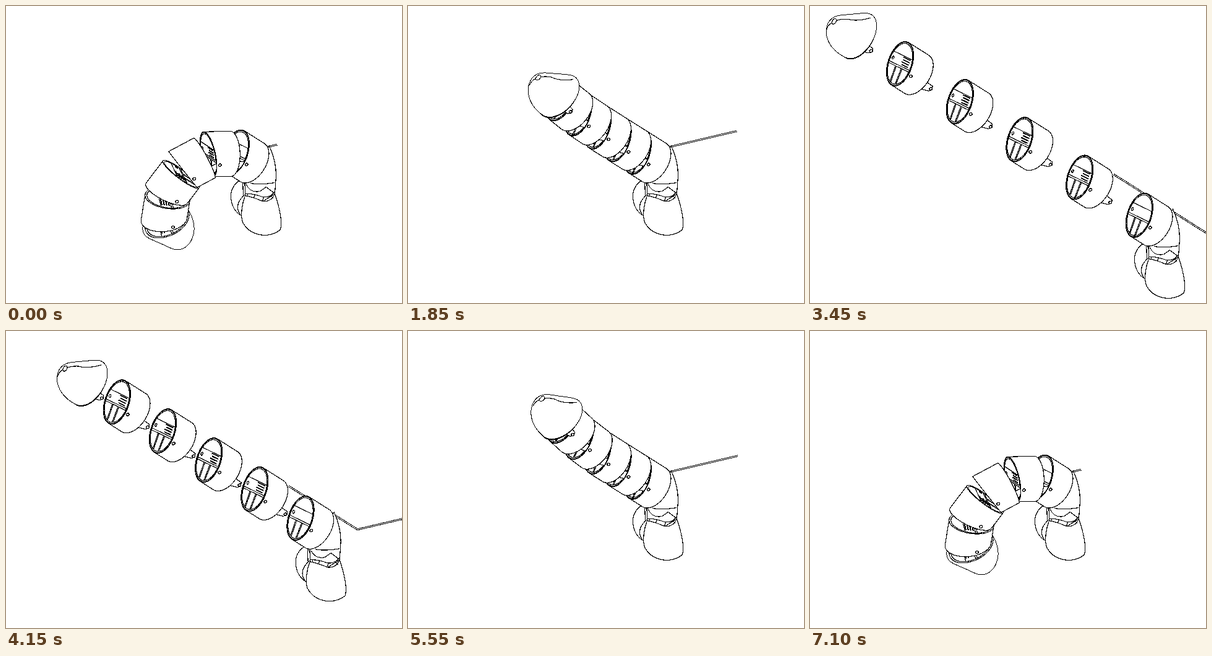
Write an HTML page that moves like this. It is 640 px wide and 480 px high and loops after 7.15 s.

```html
<!DOCTYPE html>
<html>
<head>
<meta charset="utf-8">
<style>
html, body { margin: 0; height: 100%; overflow: hidden; background: #fff; }
svg { display: block; width: 640px; height: 480px; }
</style>
</head>
<body>
<svg viewBox="0 0 640 480"><g id="art" transform="translate(.5 .5)" fill="#fff" stroke="#000" stroke-width="1.2" shape-rendering="crispEdges"></g></svg>
<script>
// Screen projection (x, y, depth) of the arm axis, its curl direction and the hinge pin.
const U = [-.683, -.431, .59], V = [-.628, .759, -.171], W = [.374, .487, .789];
const L = 47.3, R = 36.5, LOOP = 7150, TICK = 50;
const SPREAD = [64.4, 40.8], HINGE = [374.6, 238, 0];
const art = document.getElementById('art');

const clamp = (x, lo, hi) => Math.min(hi, Math.max(lo, x));
const mix = (a, A, b, B) => A.map((n, i) => a * n + b * B[i]);
const range = (n, f) => Array.from({length: n}, (_, i) => f(i));
const fmt = p => p[0].toFixed(1) + ' ' + p[1].toFixed(1);
const line = pts => 'M' + pts.map(fmt).join('L');
const loop = pts => line(pts) + 'Z';
const arc = ([a, b, c]) => `M${fmt(a)}Q${fmt(b)} ${fmt(c)}`;
const path = (d, attrs = '') => `<path d="${d}" ${attrs}/>`;
const OPEN = 'fill="none"', BARE = 'stroke="none"';

function hull(pts) {
  pts = [...pts].sort((a, b) => a[0] - b[0] || a[1] - b[1]);
  const half = list => {
    const out = [];
    for (const p of list) {
      while (out.length > 1) {
        const [a, b] = out.slice(-2);
        if ((b[0] - a[0]) * (p[1] - a[1]) - (b[1] - a[1]) * (p[0] - a[0]) > 0) break;
        out.pop();
      }
      out.push(p);
    }
    return out.slice(0, -1);
  };
  return [...half(pts), ...half(pts.reverse())];
}

// Circle around the axis; plane(v) gives the position of the cut along it.
const circle = (at, r, plane, v0 = 0, w0 = 0) => range(48, i => {
  const f = i * Math.PI / 24, v = v0 + r * Math.cos(f);
  return at(plane(v), v, w0 + r * Math.sin(f));
});

const front = v => L + 5.5 - .227 * v;
const back = () => L - 34;
const headBack = () => 12;

function opening(at, r, plane, geared) {
  // m runs along the shelves, n across them.
  const inside = (m, n) => {
    const v = .96 * n - .27 * m;
    return at(plane(v), v, .27 * n + .96 * m);
  };
  const edge = x => Math.sqrt((r - 3) ** 2 - x * x);
  const shelves = [-14, 3, 6].map(n => line([inside(-edge(n), n), inside(edge(n), n)]));
  const ribs = [-11, -8, 8, 11].map(m => line([inside(m, 6), inside(m * .9, edge(m))]));
  const teeth = range(4, i => line([inside(2 + 3 * (i % 2), i * 4 - 12), inside(26, i * 4 - 12)]));
  return path(loop(circle(at, r, plane))) +
    path(loop(circle(at, r - 3, plane))) +
    path(shelves.join('') + ribs.join(''), OPEN) +
    (geared ? path(teeth.join(''), OPEN + ' stroke-width="2"') : '') +
    path(loop(circle(at, 2.6, plane, 3, -26)));
}

function pin(at, u) {
  const [x, y] = at(u, 0, R);
  return `<ellipse cx="${x}" cy="${y}" rx="2.4" ry="2" transform="rotate(-25 ${x} ${y})" stroke-width="1.4"/>`;
}

function lug(at) {
  const edge = [[17, -6], [0, -5], [-4, 0], [0, 5], [17, 10]];
  return path(loop(edge.map(([u, v]) => at(u, v, R - 1)))) + pin(at, 0);
}

function ring({at, a, b}, next, geared) {
  const rim = circle(at, R, front), body = hull([...rim, ...circle(at, R, back)]);
  let out = path(loop(body));
  if (a[2] + .227 * b[2] > 0) {
    out += opening(at, R, front, geared) + lug(next.at) +
      path(loop(body) + loop(rim), 'fill-rule="evenodd" stroke="none"') +
      path(loop(body) + loop(rim) + loop(circle(at, R - 1, front)), OPEN);
  }
  if (a[2] < 0) out += opening(at, R, back, true);
  return out + pin(at, L);
}

// The dome tapers to a round tip and droops below the axis.
function domeSlice(at, t) {
  const r = 40 * Math.sqrt(1 - t ** 1.5) - 2 * Math.sin(Math.PI * t);
  const up = 2 - 8 * Math.sin(.75 * Math.PI * t);
  return circle(at, Math.max(r, 1), () => 12 + 58 * t, -up);
}

function head({at, a}) {
  const slices = range(13, i => domeSlice(at, i / 12));
  const skin = slices.slice(1).map((c, i) => loop(hull([...c, ...slices[i]])));
  let out = path(loop(circle(at, 39, () => 10)));
  out += skin.map(d => path(d, 'stroke-width="2"')).join('') + skin.map(d => path(d, BARE)).join('');
  if (a[2] < 0) return out + opening(at, 38, headBack, true);
  const side = ([u, h]) => at(u, -h, 0);
  const crease = [[[16, 38], [33, 20], [50, 16]], [[50, 16], [62, 10], [67, 2]], [[69, -2], [74, -8], [69, -18]]];
  return out + path(crease.map(c => arc(c.map(side))).join(''), OPEN) +
    path(loop(circle(at, 5, () => 68, -1)));
}

// Far lobe, neck, near lobe with its collar.
const solids = [
  'M382 279C370 284 363 295 363 306C363 323 371 334 381 339L390 305Z',
  'M425 226C433 243 436 258 436 274L434 303L415 315L386 306V282Z',
  'M386 306C381 319 378 338 382 349C390 364 404 370 420 370C431 369 438 365 443 361C446 350 444 333 434 303Q428 317 414 315Q398 308 386 306Z'
];
const folds = 'M386 304Q367 320 378 337M382 280L383 306M395 286Q410 289 434 285' +
  'M388 288Q394 302 410 299L420 292L433 302M386 303Q398 302 414 308Q427 310 434 299' +
  'M390 303V307M402 304L400 309M416 308L414 315M428 306L431 311';

function base(seg, next) {
  return `<g transform="translate(${seg.shift})">` + solids.map(d => path(d)).join('') +
    path(folds, OPEN) + '</g>' + ring(seg, next, false);
}

function cable(bend, e) {
  const x = 526 - .568 * bend, y = 227.5 - .235 * (x - 421);
  const move = (px, py, k) => [px + SPREAD[0] * k * e, py + SPREAD[1] * k * e];
  const d = line([move(393, 210, 1.5), move(421, 227.5, 3.5), move(x, y, 3.5)]);
  return path(d, OPEN + ' stroke-width="3"') + path(d, OPEN + ' style="stroke:#fff;stroke-width:1"');
}

function render(t) {
  const step = start => clamp(Math.floor(t / TICK) - start / TICK + 1, 0, 20);
  const raise = step(200) - step(6150), relax = step(1350) - step(5000);
  const e = (step(2500) - step(3850)) / 20;
  // Joints take turns, four steps each, starting at the tip.
  const turn = (s, j) => clamp((s - 4 * (5 - j)) / 4, 0, 1);

  let origin = mix(1, HINGE, -L, U), angle = 0;
  const segs = range(6, k => {
    if (k) angle += 31 - 35 * turn(raise, k) + 4 * (1 - turn(20 - relax, k));
    const f = angle * Math.PI / 180, c = Math.cos(f), s = Math.sin(f);
    const a = mix(c, U, s, V), b = mix(-s, U, c, V), o = origin;
    const shift = SPREAD.map(n => n * (2.5 - k) * e);
    const at = (u, v, w) => [0, 1].map(i => o[i] + shift[i] + u * a[i] + v * b[i] + w * W[i]);
    origin = mix(1, o, L, a);
    return {k, a, b, at, shift, depth: o[2] + a[2] * L / 2};
  });

  art.innerHTML = cable(angle, e) + [...segs].sort((p, q) => p.depth - q.depth).map(seg =>
    seg.k === 5 ? lug(seg.at) + head(seg) :
    seg.k ? ring(seg, segs[seg.k + 1], true) : base(seg, segs[1])
  ).join('');
}

const began = performance.now();
let shown = -1;
function tick() {
  const t = (performance.now() - began) % LOOP, n = Math.floor(t / TICK);
  if (n !== shown) render(t);
  shown = n;
  requestAnimationFrame(tick);
}
tick();
</script>
</body>
</html>
```
